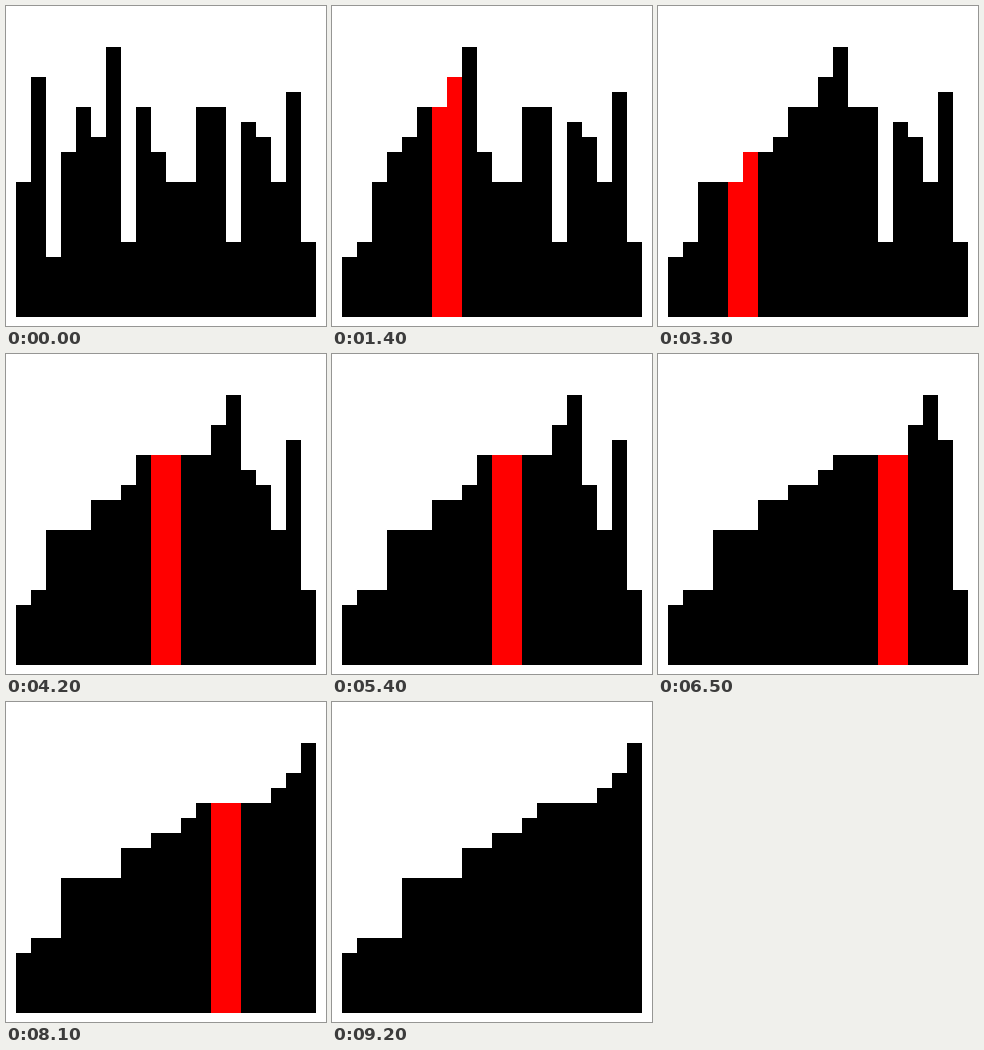
Recreate the animation shown at these times as an HTML page. Size 320 by 320 pixels, loop 9.3 s.

```html
<!DOCTYPE html>
<html lang="en">
<head>
<meta charset="utf-8">
<title>Insertion sort</title>
<style>
  html, body { margin: 0; width: 100%; height: 100%; overflow: hidden; background: #fff; }
  svg { display: block; width: 100vw; height: 100vh; }
</style>
</head>
<body>
<svg id="stage" viewBox="0 0 320 320" shape-rendering="crispEdges"></svg>
<script>
  const STEP = 100, UNIT = 15, LEFT = 10, BASE = 311;
  const start = [9, 16, 4, 11, 14, 12, 18, 5, 14, 11, 9, 9, 14, 14, 5, 13, 12, 9, 15, 5];

  // One state per shift; the key drops into place with its last shift.
  function sortStates(values) {
    const a = values.slice();
    const states = [{ bars: a.slice(), hot: -2 }];
    for (let i = 1; i < a.length; i++) {
      const key = a[i];
      for (let j = i - 1; j >= 0 && a[j] > key; j--) {
        a[j + 1] = a[j];
        if (j === 0 || a[j - 1] <= key) a[j] = key;
        states.push({ bars: a.slice(), hot: j });
      }
    }
    states.push({ bars: a.slice(), hot: -2 });
    return states;
  }

  const states = sortStates(start);
  const stage = document.getElementById('stage');
  const rects = start.map((_, i) => {
    const r = document.createElementNS('http://www.w3.org/2000/svg', 'rect');
    r.setAttribute('x', LEFT + i * UNIT);
    r.setAttribute('width', UNIT);
    return stage.appendChild(r);
  });

  let shown = -1;
  function render(ms) {
    const n = Math.floor(ms / STEP) % states.length;
    if (n === shown) return;
    shown = n;
    const { bars, hot } = states[n];
    rects.forEach((r, i) => {
      const h = bars[i] * UNIT;
      r.setAttribute('y', BASE - h);
      r.setAttribute('height', h);
      r.setAttribute('fill', i === hot || i === hot + 1 ? '#f00' : '#000');
    });
  }

  const t0 = performance.now();
  function tick() {
    render(performance.now() - t0);
    requestAnimationFrame(tick);
  }
  tick();
</script>
</body>
</html>
```
